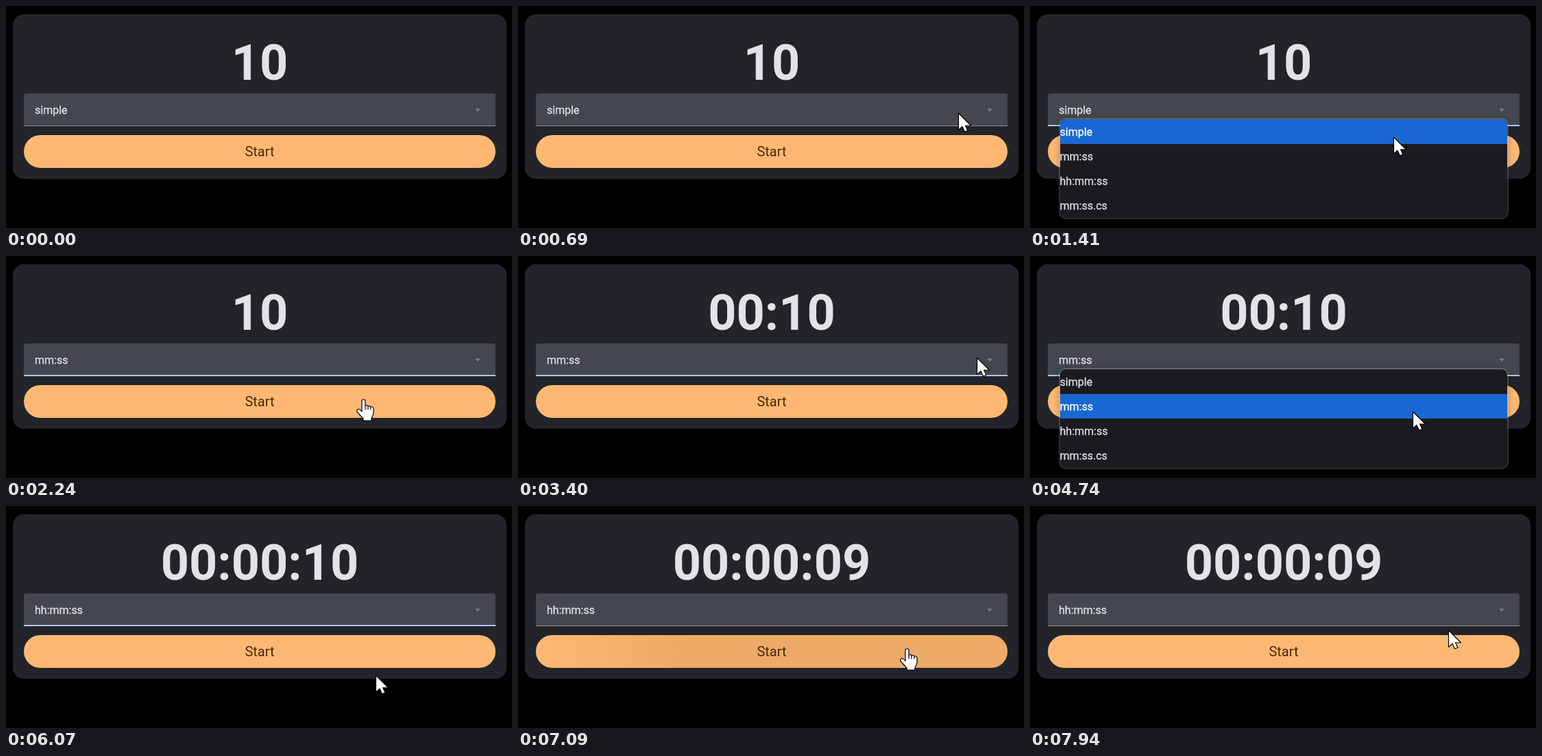
Animation of 738x325 px, one loop 8 s. Source, as an HTML page:

```html
<!DOCTYPE html>
<html lang="en">
<head>
<meta charset="utf-8">
<title>Countdown format</title>
<style>
  html, body { margin: 0; width: 100%; height: 100%; overflow: hidden; background: #000; }
  svg { display: block; width: 100%; height: 100%; font: 16px Roboto, sans-serif; }
  .light { fill: #e3e2e6; }
  .small { stroke: #e3e2e6; stroke-width: .3; }
  .small .active { fill: #fff; stroke: #fff; }
  #digits { font-size: 72px; font-weight: 700; text-anchor: middle; }
  #label { font-size: 20px; text-anchor: middle; fill: #4a2800; }
  #list { filter: drop-shadow(0 2px 5px rgba(0, 0, 0, .4)); }
  .cursor { fill: #fff; stroke: #000; stroke-width: 1.2; stroke-linejoin: round; }
</style>
</head>
<body>
<svg viewBox="0 0 738 325">
  <defs>
    <clipPath id="pill"><rect x="26" y="189" width="688" height="48" rx="24"/></clipPath>
    <clipPath id="rows"><rect x="44" y="166" width="652" height="144" rx="8"/></clipPath>
    <radialGradient id="soft">
      <stop offset=".6" stop-color="#4a2800"/>
      <stop offset="1" stop-color="#4a2800" stop-opacity="0"/>
    </radialGradient>
  </defs>
  <rect x="10" y="12" width="720" height="241" rx="16" fill="#232429"/>
  <text id="digits" class="light" x="370" y="108"></text>

  <path d="M26 176V132Q26 128 30 128H710Q714 128 714 132V176Z" fill="#45474e"/>
  <rect id="underline" x="26" width="688"/>
  <text id="choice" class="light small" x="42" y="158"></text>
  <path d="M684 150H692L688 155Z" fill="#75767c"/>

  <g clip-path="url(#pill)">
    <rect x="26" y="189" width="688" height="48" fill="#ffb873"/>
    <circle id="ripple" cx="567" cy="209" fill="url(#soft)"/>
  </g>
  <text id="label" x="370" y="220">Start</text>

  <g id="menu">
    <rect id="list" x="44" y="166" width="652" height="144" rx="8" fill="#1b1b1f"/>
    <rect x="43" y="165" width="654" height="146" rx="9" fill="none" stroke="#fff" stroke-opacity=".18" stroke-width="2"/>
    <g clip-path="url(#rows)"><rect id="highlight" x="44" width="652" height="36" fill="#1967d2"/></g>
    <g id="options" class="light small"></g>
  </g>

  <g id="pointer" class="cursor">
    <path id="arrow" d="M-.5 0V24.5L5 19.5 8.5 27 13 25.3 9.5 18H17.5Z"/>
    <path id="hand" d="M-2 2Q-2 0 .5 0T3 2V9Q6 8 7 10Q10 9 11 11Q14 10 15 13V20Q15 23 12 27V31H0V28Q-4 24 -9 18Q-10 15 -7 14Q-5 14 -2 18ZM3 9V15M7 10V15M11 11V15"/>
  </g>
</svg>
<script>
const LOOP = 8000;
const ENTER = 60, PRESS = 6900;
const FIRST_OPEN = 700, FIRST_PICK = 2050, SECOND_OPEN = 4100, SECOND_PICK = 5430;
const DIGITS_DELAY = 200, TICK_DELAY = 140;
const ROW = 36, LIST_TOP = 166;
const formats = ['simple', 'mm:ss', 'hh:mm:ss', 'mm:ss.cs'];

// Each glide heads for a point; the bends shape its speed per axis (1 is steady, more slows down late).
const glide = (from, to, x, y, bendX = 1, bendY = 1) => ({ from, to, x, y, bendX, bendY });
const entry = { x: 604, y: 325 };
const glides = [
  glide(ENTER, 600, 643, 157),
  glide(890, 1670, 521, 210, 2.25),
  glide(2380, 2820, 575, 176),
  glide(2950, 3660, 682, 146, 2.2, 2.2),
  glide(4360, 4800, 540, 248, 1, 0.8),
  glide(6070, 6700, 567, 209),
  glide(7450, 7940, 611, 182)
];

const el = Object.fromEntries([...document.querySelectorAll('[id]')].map(e => [e.id, e]));
const set = (e, attrs) => { for (const k in attrs) e.setAttribute(k, attrs[k]); };
const show = (e, on) => { e.style.display = on ? '' : 'none'; };
const between = (v, from, to) => v >= from && v < to;
const progress = (t, from, to) => Math.min(1, Math.max(0, (t - from) / (to - from)));
const easeOut = (k, power) => 1 - (1 - k) ** power;

el.options.innerHTML = formats
  .map((name, i) => `<text x="43.5" y="${LIST_TOP + 24 + i * ROW}">${name}</text>`).join('');

function pointerAt(t) {
  let { x, y } = entry;
  for (const g of glides) {
    const k = progress(t, g.from, g.to);
    x += (g.x - x) * easeOut(k, g.bendX);
    y += (g.y - y) * easeOut(k, g.bendY);
  }
  return [Math.round(x), Math.round(y)];
}

const choiceAt = t => (t >= FIRST_PICK) + (t >= SECOND_PICK);

// "simple" shows bare seconds; every further format adds a leading pair of digits.
const clock = (seconds, format) =>
  '00:'.repeat(format) + String(seconds).padStart(format ? 2 : 1, '0');

function draw(t) {
  const [x, y] = pointerAt(t);
  const choice = choiceAt(t);
  const open = between(t, FIRST_OPEN, FIRST_PICK) || between(t, SECOND_OPEN, SECOND_PICK);
  el.choice.textContent = formats[choice];
  el.digits.textContent = clock(t < PRESS + TICK_DELAY ? 10 : 9, choiceAt(t - DIGITS_DELAY));

  const focused = between(t, FIRST_OPEN, PRESS);
  set(el.underline, focused
    ? { y: 174, height: 2, fill: '#b0c6ff' }
    : { y: 175, height: 1, fill: '#909099' });

  const hovered = Math.floor((y - LIST_TOP) / ROW);
  const active = hovered < 0 ? choice : hovered;
  show(el.menu, open);
  set(el.highlight, { y: LIST_TOP + ROW * active });
  [...el.options.children].forEach((row, i) => row.classList.toggle('active', i === active));

  set(el.ripple, {
    r: 800 * easeOut(progress(t, PRESS, PRESS + 450), 2),
    opacity: 0.1 * (1 - progress(t, PRESS + 250, PRESS + 650))
  });

  const onButton = !open && between(y, 189, 237);
  show(el.pointer, t >= ENTER);
  show(el.arrow, !onButton);
  show(el.hand, onButton);
  set(el.pointer, { transform: `translate(${x} ${y})` });
}

const start = performance.now();
function frame() {
  draw((performance.now() - start) % LOOP);
  requestAnimationFrame(frame);
}
frame();
</script>
</body>
</html>
```
